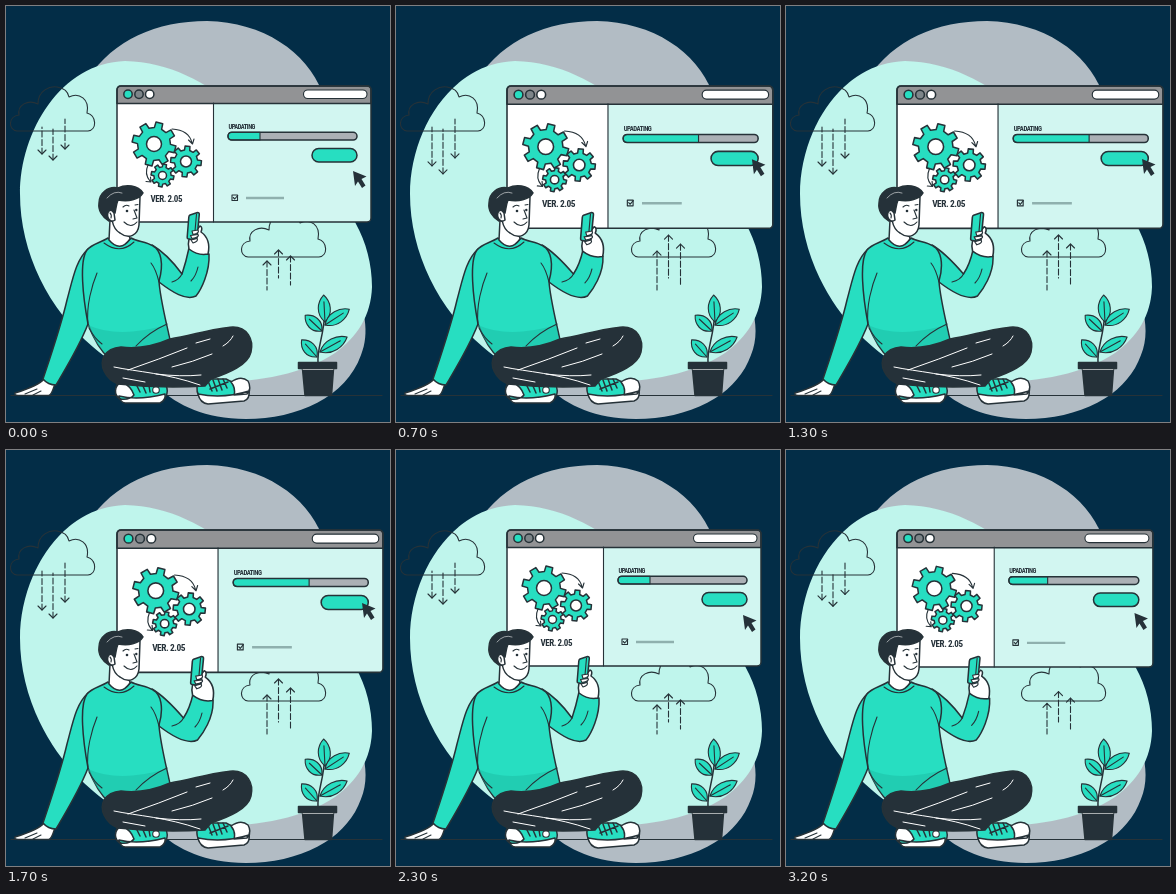
These frames come from a looping animation (384 px wide and 416 px high, 3.3 s). An HTML page:

```html
<!DOCTYPE html>
<html lang="en">
<head>
<meta charset="utf-8">
<title>Updating</title>
<style>
html, body { margin: 0; width: 100%; height: 100%; overflow: hidden; background: #032d47; }
svg { display: block; width: 384px; height: 416px; }
.o { stroke: #263238; stroke-width: 1.5; stroke-linejoin: round; stroke-linecap: round; }
.n { fill: none; }
.thin { stroke-width: 1.1; }
.t { fill: #27dec1; }
.w { fill: #fff; }
.d { fill: #253139; }
.g { fill: #929395; }
.s { fill: #1cbfa6; }
.hi { fill: none; stroke: #fff; stroke-width: 1; stroke-linecap: round; }
text { font-family: "Roboto Condensed", "Open Sans Condensed", "Open Sans", sans-serif; font-stretch: 75%; font-weight: 700; fill: #253139; }
</style>
</head>
<body>
<svg viewBox="0 0 384 416">
  <defs>
    <path id="cloud" class="o n thin" d="M11 125 C2 124 2 110 13 109 C11 99 22 93 32 98 C32 84 44 80 51 81 C58 82 62 86 63 91 C73 86 84 93 81 107 C91 110 91 124 82 125 Z"/>
  </defs>

  <path fill="#b2bcc4" d="M82 72 C108 34 150 15 201 15 C257 16 301 46 316 86 C331 134 322 205 346 270 C359 303 364 327 355 349 C340 391 292 413 240 413 C198 412 174 401 150 380 C90 330 55 135 82 72 Z"/>
  <path fill="#bff5ec" d="M14 188 C14 125 55 57 119 55 C164 56 199 76 235 104 C284 140 335 181 350 218 C360 236 366 258 366 281 C365 310 351 331 329 347 C296 369 249 377 199 376 C151 375 115 366 87 341 C43 304 14 247 14 188 Z"/>

  <use href="#cloud"/>
  <use href="#cloud" x="231" y="126"/>
  <g id="arrows" class="o n thin"></g>

  <g id="win">
    <rect x="111" y="80" width="254" height="136" rx="4" fill="#d2f6f1"/>
    <path class="w" d="M111 97 H207.500 V216 H115 Q111 216 111 212 Z"/>
    <path class="o g" d="M111 97.500 V84 Q111 80 115 80 H361 Q365 80 365 84 V97.500 Z"/>
    <path class="o n thin" d="M207.500 97 V216"/>
    <rect class="o n" x="111" y="80" width="254" height="136" rx="4"/>
    <circle class="o t" cx="122" cy="88.300" r="4.200"/>
    <circle class="o" fill="#7d8589" cx="133" cy="88.300" r="4.200"/>
    <circle class="o w" cx="143.700" cy="88.300" r="4.200"/>
    <rect class="o w thin" x="297.500" y="84" width="63.500" height="8.500" rx="4.200"/>
    <g id="gears"></g>
    <path class="o n thin" d="M166 123 Q183 124 186 137 M182.500 134 L186.500 138 L188 133"/>
    <path class="o n thin" d="M142 159 Q138 168 144 175 M140 175.500 L145 176 L144.500 171"/>
    <text x="160.300" y="196" font-size="9" letter-spacing="-.45" text-anchor="middle">VER. 2.05</text>
    <text x="222.500" y="122.700" font-size="6.500" letter-spacing="-.5">UPADATING</text>
    <rect fill="#abb0b5" x="222" y="126.300" width="129" height="7.700" rx="3.800"/>
    <path id="fill" class="o t thin"/>
    <rect class="o n" x="222" y="126.300" width="129" height="7.700" rx="3.800"/>
    <rect class="o t" x="306" y="142.500" width="45" height="13.500" rx="6.700"/>
    <rect class="o n thin" x="226" y="189" width="5.500" height="5.500"/>
    <path class="o n thin" d="M227.300 191.500 L228.700 193 L231.700 189.500"/>
    <path d="M240 192 H278" stroke="#8fb0ae" stroke-width="2.300"/>
  </g>
  <path id="cursor" class="d" d="M347 165 L360.500 170.500 L355.500 173 L359.500 179.500 L356 182 L352 175.500 L349 180 Z"/>

  <path class="o n thin" d="M5 389.500 H376"/>

  <!-- plant -->
  <path class="o n" d="M312 357 C311 341 318 331 319 304"/>
  <g id="leaves"></g>
  <path class="o d" d="M296.500 363 H327.500 L325.500 389.500 H299 Z"/>
  <rect class="o d" x="292.500" y="356.500" width="38" height="6"/>
  <path class="hi" stroke-opacity=".6" d="M297 363.500 H327"/>

  <!-- man -->
  <path class="o w" d="M38 373 C34 378 25 382 9 387 Q8 389.500 12 389.500 L43 389.500 C47 387 47 382 49 378 Z"/>
  <path class="o n thin" d="M19 388 L31 383 M27 389 L35 385"/>
  <path class="o t" d="M82 243 C70 254 67 272 61 294 C55 320 45 349 37 373 Q42 379 50 379 C60 362 73 341 82 318 L98 285 Z"/>
  <g id="arm"></g>
  <path class="o t" d="M102 232 C94 237 86 238 81 244 C73 255 77 291 82 318 Q91 342 103 352 Q138 348 164 334 C160 315 154 292 153 275 C158 258 155 244 147 240 C140 235 132 236 125 232 Q114 246 102 232 Z"/>
  <path class="s" d="M82 319 Q112 333 160 319 L163 333 Q134 350 104 351 Q90 341 82 319 Z" opacity=".55"/>
  <path class="o n thin" d="M82 318 C80 300 86 279 91 267 M153 276 C151 268 149 262 145 257 M161 318 Q143 326 130 340 M83 322 Q88 332 96 338 M98 237 Q114 249 128 236"/>
  <path class="o w" d="M104 214 L103 234 Q114 247 124 233 L123 228 Z"/>
  <path class="o w" d="M107 192 C104 209 105 222 114 227 C123 234 132 229 133 219 L134 191 Z"/>
  <path class="o w" d="M108 207 C103 200 98 207 102 212 Q105 217 109 214 Z"/>
  <path class="o d" d="M103 215 C96 211 92 204 93 197 C93 187 102 180 112 182 C120 178 132 179 137 187 C133 194 122 196 112 194 C110 199 110 203 109 207 C105 201 99 205 103 215 Z"/>
  <path class="hi" d="M101 192 Q108 184 116 187" stroke-opacity=".55"/>
  <path class="o n thin" d="M117 201 Q120 198 123 200 M129 199 L132 198.500 M128 204 L131 212 L127 213 M118 216 Q125 223 131 216 M104 207 Q106 209 105 212"/>
  <circle class="d" cx="121" cy="205" r="1.300"/>
  <circle class="d" cx="130.300" cy="204" r="1.200"/>

  <!-- shoes and legs -->
  <path class="o t" d="M115 374 L158 376 C164 384 161 393 154 396 L116 394 C107 391 108 379 115 374 Z"/>
  <path class="o w" d="M116 376 C108 379 107 390 115 393 Q124 394 128 389 Q125 380 116 376 Z M113 390 Q132 395 159 388 Q160 394 154 397 H119 Q114 396 113 390 Z"/>
  <circle class="o w thin" cx="150" cy="384" r="3.300"/>
  <path class="o t" d="M197 373 L220 373 Q230 379 241 376 Q246 384 241 391 L200 395 Q190 391 191 381 Z"/>
  <path class="o w" d="M225 376 Q235 369 242 375 Q246 382 241 388 L228 389 Q230 382 225 376 Z M192 388 Q217 393 243 385 Q244 393 238 395 L202 398 Q194 397 192 388 Z"/>
  <path class="o d" d="M164 333 C184 330 208 322 227 321 C241 321 248 333 245 346 C242 359 223 367 205 373 L199 380 C169 382 139 381 112 378 C99 373 93 359 98 350 Q103 342 115 341 Q139 344 164 333 Z"/>
  <path class="hi" d="M108 361 C132 366 160 367 194 379 M122 364 Q154 353 181 342 M166 361 Q187 356 206 348 M150 368 Q175 371 195 369 M190 337 L204 333 M117 372 L139 376 M217 340 Q224 336 227 330"/>
  <path class="o n" d="M131 380 L134 386 M137 380 L140 387 M143 380 L144 386 M202 375 L206 385 M207 374 L211 385 M212 373 L216 384 M217 373 L221 382 M204 383 L222 376"/>
</svg>
<script>
const $ = id => document.getElementById(id);
const LOOP = 3300, FRAME = 100, MOVE = 350;

function gear(cx, cy, r, hole, teeth, turn) {
  const pts = [], step = 2 * Math.PI / teeth;
  for (let i = 0; i < teeth; i++)
    for (const [off, k] of [[-.29, .75], [-.2, 1], [.2, 1], [.29, .75]]) {
      const a = (i + off) * step + turn;
      pts.push((cx + r * k * Math.cos(a)).toFixed(2) + ' ' + (cy + r * k * Math.sin(a)).toFixed(2));
    }
  return `<path class="o t" d="M${pts.join('L')}Z"/><circle class="o w" cx="${cx}" cy="${cy}" r="${hole}"/>`;
}
$('gears').innerHTML = gear(148, 138, 22, 7.5, 8, .25) + gear(180, 155.5, 15.5, 5.5, 8, .1) + gear(156.5, 169.5, 11.5, 4, 8, .2);

// base x, base y, length, angle from upright
const leaves = [[319, 316, 27, -3], [319, 319, 29, 57], [316, 325, 23, -47], [314, 346, 31, 61], [311, 351, 23, -42]];
$('leaves').innerHTML = leaves.map(([x, y, n, a]) =>
  `<g transform="translate(${x} ${y}) rotate(${a})"><path class="o t thin" d="M0 0 C-9 ${-n * .3} -7 ${-n * .75} 0 ${-n} C7 ${-n * .75} 9 ${-n * .3} 0 0 Z"/><path class="o n thin" d="M0 0 V${-n * .75}"/></g>`).join('');

// x, tail y, tip y at rest, tip y when stretched
const arrows = [[36, 121, 148, 160], [47, 123, 154, 168], [59, 113, 143, 152],
                [261, 284, 255, 245], [272.500, 272, 244, 229], [284.500, 279, 250, 238]];

function arrow([x, tail, a, b], k) {
  const tip = a + (b - a) * k, back = tip + (tip > tail ? -4 : 4);
  return `<path stroke-dasharray="6 2.500" d="M${x} ${tip}V${tail}"/><path d="M${x - 4} ${back}L${x} ${tip}L${x + 4} ${back}"/>`;
}

function arm(k) {
  const dx = 4 * k, dy = 2 * k, e = 1.5 * k;
  const p = (x, y) => (x + dx) + ' ' + (y + dy);
  return `<path class="o t" d="M146 239 C158 246 168 257 ${176 + e} 268 Q${p(180, 256)} ${p(183, 242)} Q${p(192, 249)} ${p(203, 248)} C${p(204, 266)} ${195 + e} 284 ${190 + e} 290 C${180 + e} 295 166 286 153 276 Z"/>
    <path class="o n thin" d="M${176 + e} 268 Q${173 + e} 274 166 276 M${p(192, 261)} Q${p(190, 270)} ${p(185, 275)}"/>
    <g transform="translate(${dx} ${dy}) translate(190 240) scale(${1 + .06 * k}) translate(-190 -240)">
      <path class="o w" d="M183 243 C181 235 184 230 188 227 L194 220 Q197 221 195 226 C202 231 204 239 202 248 Q192 250 183 243 Z"/>
      <path class="o t" d="M184 209 L191.500 206.500 Q193.500 206.500 193.300 208.500 L191 232 Q190.500 234 188.500 234 L183 233 Q181 233 181.200 231 L182.800 211 Q183 209.500 184 209 Z"/>
      <path class="o n thin" d="M190.500 208 L188.300 233"/>
      <path class="o w thin" d="M186 225 L192 224 Q194 227 187 228.500 Z M184.500 229.500 L192 228.500 Q194 231 186 232.500 Z M185 234 L191 232.500 Q193 235 187 237 Z"/>
    </g>`;
}

function ease(t, start) {
  const p = Math.min(1, Math.max(0, (t - start) / MOVE));
  return p < .5 ? 4 * p ** 3 : 1 - 4 * (1 - p) ** 3;
}

function draw(now) {
  const t = Math.floor(now % LOOP / FRAME) * FRAME;
  const k = ease(t, 400) - ease(t, 1780) + ease(t, 3080);
  $('win').setAttribute('transform', `translate(111 80) scale(${1 + .047 * k}) translate(-111 -80)`);
  $('fill').setAttribute('d', `M225.800 126.300 H${254 + 40.5 * k} V134 H225.800 Q222 134 222 130.150 Q222 126.300 225.800 126.300 Z`);
  $('cursor').setAttribute('transform', `translate(${9 * k} ${-12 * k})`);
  $('arrows').innerHTML = arrows.map(a => arrow(a, k)).join('');
  $('arm').innerHTML = arm(k);
}

const begin = performance.now();
(function tick() {
  draw(performance.now() - begin);
  requestAnimationFrame(tick);
})();
</script>
</body>
</html>
```
